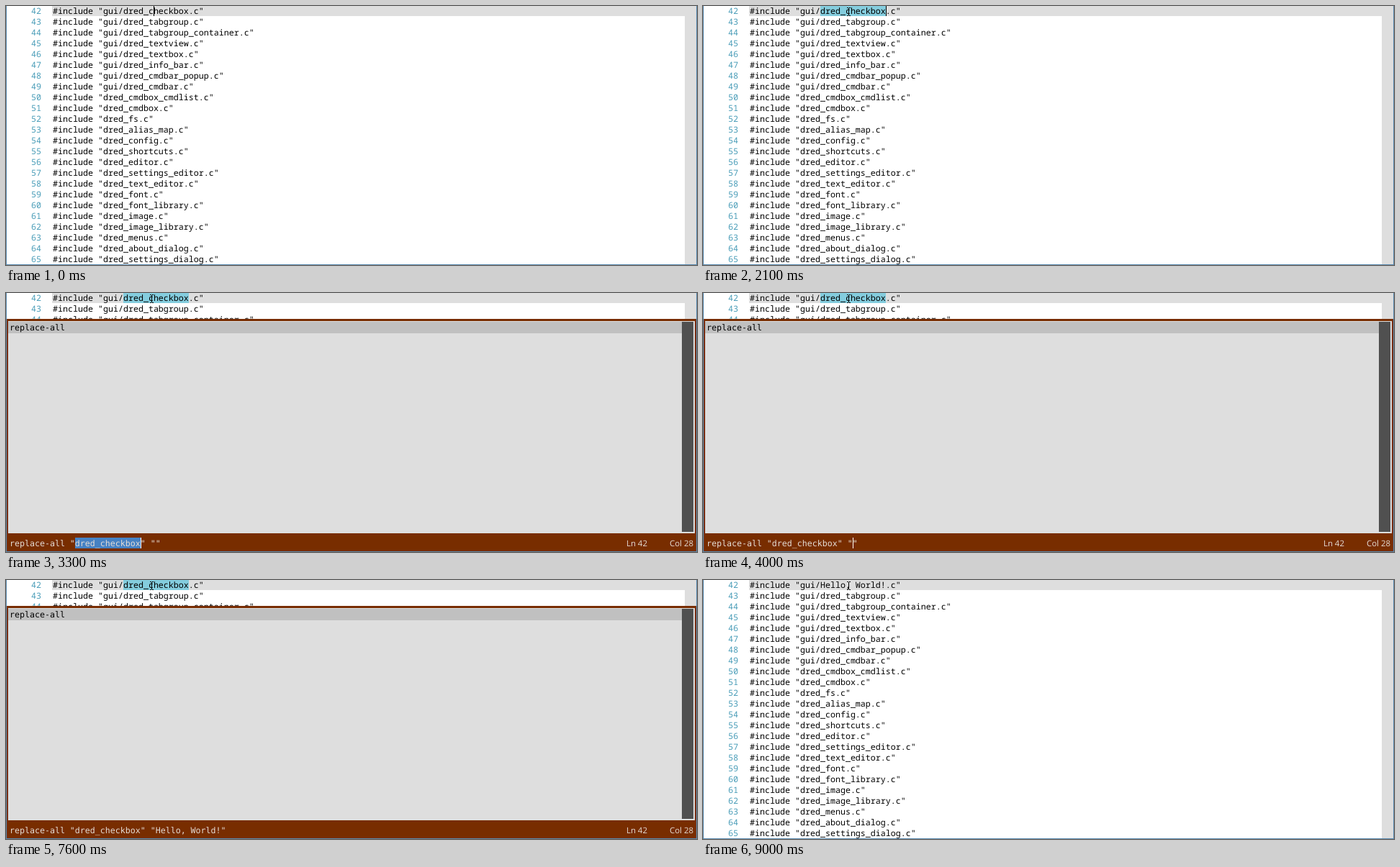
An HTML page for the animation above (9.1 s loop, 960x360 px).

```html
<!DOCTYPE html>
<html lang="en">
<head>
<meta charset="utf-8">
<title>Replace all</title>
<style>
html, body { margin: 0; width: 100%; height: 100%; overflow: hidden; background: #fff; }
svg { display: block; width: 960px; height: 360px; }
text { white-space: pre; text-rendering: geometricPrecision; }
.code { font: 11.667px "Noto Sans Mono", "DejaVu Sans Mono", monospace; }
.cmd { font: 11.627px "DejaVu Sans Mono", "Noto Sans Mono", monospace; }
.ui { font: 11.4px "Open Sans", "Noto Sans", sans-serif; }
</style>
</head>
<body>
<svg id="stage" viewBox="0 0 960 360" xmlns="http://www.w3.org/2000/svg"></svg>
<script>
const LOOP = 9100, CHAR = 7, ROW = 15, CODE_X = 65, CMD_X = 5;
const BROWN = '#782d00', GREY = '#dedede', MID = '#c0c0c0', EDGE = '#5b8bb0';
const WORD = 'dred_checkbox', REPLACEMENT = 'Hello, World!';
const FILES = ['gui/dred_tabgroup', 'gui/dred_tabgroup_container', 'gui/dred_textview',
  'gui/dred_textbox', 'gui/dred_info_bar', 'gui/dred_cmdbar_popup', 'gui/dred_cmdbar',
  'dred_cmdbox_cmdlist', 'dred_cmdbox', 'dred_fs', 'dred_alias_map', 'dred_config',
  'dred_shortcuts', 'dred_editor', 'dred_settings_editor', 'dred_text_editor', 'dred_font',
  'dred_font_library', 'dred_image', 'dred_image_library', 'dred_menus',
  'dred_about_dialog', 'dred_settings_dialog'];
// Time at which each replacement character is typed
const KEYS = [4900, 5000, 5300, 5400, 5500, 5800, 5900, 6100, 6300, 6300, 6500, 6600, 6900];

const stage = document.getElementById('stage');

function add(parent, tag, attrs, content) {
  const el = document.createElementNS('http://www.w3.org/2000/svg', tag);
  for (const k in attrs) el.setAttribute(k, attrs[k]);
  if (content) el.textContent = content;
  parent.appendChild(el);
  return el;
}
const group = parent => add(parent, 'g', {});
const rect = (parent, x, y, width, height, fill) => add(parent, 'rect', { x, y, width, height, fill });
const text = (parent, cls, x, y, fill, content) => add(parent, 'text', { class: cls, x, y, fill }, content);
const show = (el, on) => el.setAttribute('visibility', on ? 'inherit' : 'hidden');
const include = name => `#include "${name}.c"`;

// Editor
const editor = group(stage);
rect(editor, 0, 0, 960, 360, '#fff');
rect(editor, 64, 0, 879, 14, GREY);
rect(editor, 943, 0, 16, 360, GREY);
const selection = rect(editor, 163, 0, WORD.length * CHAR, 14, '#84cdde');
const firstLine = text(editor, 'code', CODE_X, 11, '#000');
text(editor, 'code', 35, 11, '#4a9db8', '42');
FILES.forEach((name, i) => {
  const y = 11 + (i + 1) * ROW;
  text(editor, 'code', 35, y, '#4a9db8', String(43 + i));
  text(editor, 'code', CODE_X, y, '#000', include(name));
});
const caret = rect(editor, 0, 0, 1, 14, '#000');
const pointer = add(editor, 'path', {
  d: 'M200 2.5h2m1 0h2M202.5 3v10M200 13.5h2m1 0h2', stroke: '#000', fill: 'none'
});

// Command list
const popup = group(stage);
rect(popup, 0, 36, 960, 301, BROWN);
rect(popup, 3, 39, 954, 295, GREY);
rect(popup, 3, 40, 936, 16, MID);
rect(popup, 939, 40, 16, 292, '#505050');
text(popup, 'cmd', CMD_X, 52, '#000', 'replace-all');

// Command bar
const bar = group(stage);
rect(bar, 0, 336, 960, 24, MID);
const barFill = rect(bar, 0, 336, 960, 24, BROWN);
const barSelection = rect(bar, 96, 340, WORD.length * CHAR, 15, '#4682c4');
const command = text(bar, 'cmd', CMD_X, 352, '#e4dcd6');
const barCaret = rect(bar, 0, 340, 1, 15, '#fff');
const status = [text(bar, 'ui', 862, 352, '', 'Ln 42'), text(bar, 'ui', 922, 352, '', 'Col 28')];

// Window frame
rect(stage, 0, 0, 1, 360, EDGE);
rect(stage, 959, 0, 1, 360, EDGE);
rect(stage, 0, 359, 960, 1, EDGE);

function draw(t) {
  const within = (a, b) => t >= a && t < b;
  const open = within(2200, 8200), done = t >= 8200, closing = within(8200, 8300);

  firstLine.textContent = include('gui/' + (done ? REPLACEMENT : WORD));
  show(selection, within(700, 8200));
  show(pointer, t >= 700);
  caret.setAttribute('x', t < 700 ? 205 : 254);
  show(caret, t < 500 || within(700, 1600) || within(2100, 2200) || within(8200, 8900));

  show(popup, open);
  show(bar, open || closing);
  barFill.setAttribute('width', closing ? 480 : 960);
  status.forEach(el => el.setAttribute('fill', closing ? '#000' : '#e4dcd6'));
  show(barSelection, within(2200, 3900));

  const typed = KEYS.filter(k => t >= k).length;
  command.textContent = open ? `replace-all "${WORD}" "${REPLACEMENT.slice(0, typed)}"` : '';
  barCaret.setAttribute('x', closing ? CMD_X : t < 3900 ? 187 : 208 + typed * CHAR);
  show(barCaret, within(2200, 2800) || within(3300, 4500) || within(4900, 7400) || closing);
}

const start = performance.now();
function frame() {
  draw((performance.now() - start) % LOOP);
  requestAnimationFrame(frame);
}
frame();
</script>
</body>
</html>
```
